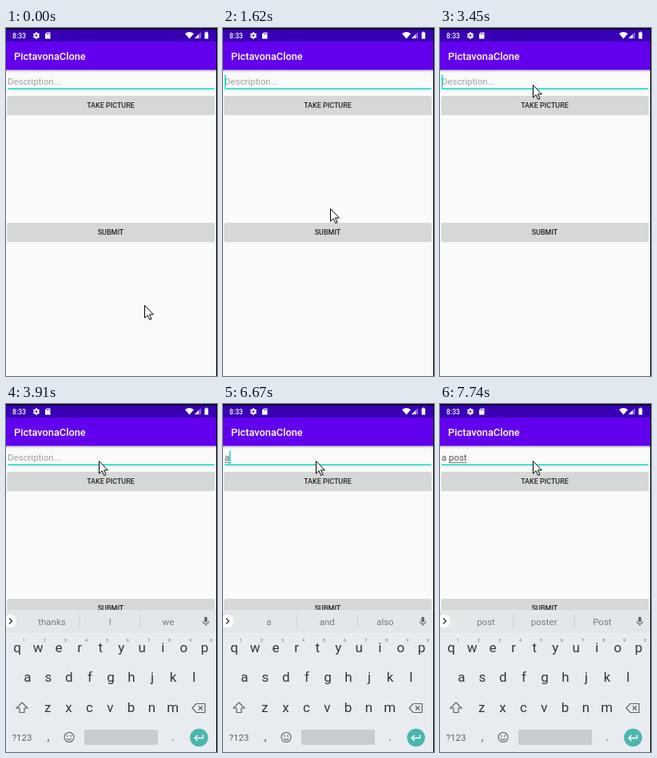
Recreate the animation shown at these times as an HTML page with a canvas. Size 264x436 px, loop 8 s.

```html
<!DOCTYPE html>
<html lang="en">
<head>
<meta charset="utf-8">
<title>Post form</title>
<style>
  html, body { margin: 0; width: 100%; height: 100%; overflow: hidden; background: #fafafa; }
  canvas { display: block; width: 264px; height: 436px; }
</style>
</head>
<body>
<canvas id="stage"></canvas>
<script>
const W = 264, H = 436, LOOP = 8000;
const canvas = document.getElementById('stage');
const ctx = canvas.getContext('2d');
const dpr = window.devicePixelRatio || 1;
canvas.width = W * dpr;
canvas.height = H * dpr;

// Each track holds its value until the next entry: [time, value]
const pointer = [
  [0, [173, 347]], [140, [173, 344]], [290, [172, 342]], [440, [170, 338]],
  [580, [170, 331]], [740, [170, 321]], [1620, [134, 226]], [1770, [105, 122]],
  [1910, [98, 88]], [2040, [95, 80]], [2190, [106, 72]], [2340, [115, 71]], [2490, [116, 71]]
];
const caretFlips = [580, 1020, 1620, 2040, 2490, 3020, 3170, 3910, 4460, 5000, 5430, 6020, 6550, 7740];
const typed = [[0, ''], [6550, 'a'], [6820, 'a p'], [6940, 'a po'], [7090, 'a pos'], [7210, 'a post']];
const words = [
  [0, ['thanks', 'I', 'we']], [6670, ['a', 'and', 'also']], [7210, ['post', 'poster', 'Post']]
];
const PRESS = [3170, 3450], KEYBOARD_AT = 3910;

const at = (track, t) => track.reduce((value, step) => t >= step[0] ? step[1] : value, track[0][1]);

function rect(x, y, w, h, color, r = 0) {
  ctx.fillStyle = color;
  ctx.beginPath();
  ctx.roundRect(x, y, w, h, r);
  ctx.fill();
}

function disc(x, y, r, color) {
  ctx.fillStyle = color;
  ctx.beginPath();
  ctx.arc(x, y, r, 0, Math.PI * 2);
  ctx.fill();
}

function label(str, x, y, size, color, align = 'center', weight = 400) {
  ctx.font = `${weight} ${size}px Roboto, Arial, sans-serif`;
  ctx.textAlign = align;
  ctx.fillStyle = color;
  ctx.fillText(str, x, y);
}

function shape(d, x, y, fill, stroke, width = 1) {
  const path = new Path2D(d);
  ctx.save();
  ctx.translate(x, y);
  if (fill) { ctx.fillStyle = fill; ctx.fill(path); }
  if (stroke) { ctx.strokeStyle = stroke; ctx.lineWidth = width; ctx.stroke(path); }
  ctx.restore();
}

function statusBar() {
  rect(0, 0, W, 18, '#3700b3');
  rect(0, 0, W, 1.5, '#000');
  label('8:33', 8, 12.5, 8.6, '#fff', 'left', 500);

  ctx.save();
  ctx.translate(38, 9.5);
  for (let i = 0; i < 6; i++) {
    rect(-1.1, -4.2, 2.2, 3, '#fff');
    ctx.rotate(Math.PI / 3);
  }
  ctx.restore();
  disc(38, 9.5, 3.2, '#fff');
  disc(38, 9.5, 1.3, '#3700b3');

  shape('M2 0H6.5V8H0V2Z', 49, 5.5, '#fff');
  for (let i = 0; i < 3; i++) rect(51 + i * 1.4, 6.5, 0.7, 1.8, '#3700b3');

  shape('M0 2Q5.5 -2 11 2L5.5 8.5Z', 224, 5, '#fff');
  shape('M8 0V8H0Z', 236, 5, 'rgba(255,255,255,.4)');
  shape('M5 3V8H0Z', 236, 5, '#fff');
  rect(248.5, 5.5, 4.6, 8, '#fff', 0.6);
  rect(249.8, 4.6, 2, 1.2, '#fff');
}

function appBar() {
  const shade = ctx.createLinearGradient(0, 52, 0, 56);
  shade.addColorStop(0, 'rgba(0,0,0,.24)');
  shade.addColorStop(1, 'rgba(0,0,0,0)');
  ctx.fillStyle = shade;
  ctx.fillRect(0, 52, W, 4);
  rect(0, 17, W, 35.4, '#6200ee');
  label('PictavonaClone', 10, 39.8, 12.8, '#fff', 'left', 500);
}

function button(str, y) {
  rect(1.5, y + 0.6, 259.4, 23.6, 'rgba(0,0,0,.14)', 1.5);
  rect(1.5, y, 259.4, 23.4, '#d6d7d7', 1.5);
  label(str, 131, y + 15.2, 8.96, '#222', 'center', 500);
}

function field(t) {
  const str = at(typed, t);
  const size = 11.4, base = 71.3;
  const pressed = t >= PRESS[0] && t < PRESS[1];
  rect(2, 75.6, 258.5, 1.3, '#03dac5');
  let end = 2;
  if (str) {
    label(str, 2, base, size, '#555', 'left');
    end += ctx.measureText(str).width;
    // The word being composed is underlined
    const start = 2 + ctx.measureText(str.slice(0, str.lastIndexOf(' ') + 1)).width;
    rect(start, 73, end - start, 0.8, '#666');
  } else {
    label('Description...', 2, base, size, pressed ? '#737373' : '#a0a0a0', 'left');
  }
  if (caretFlips.filter(f => t >= f).length % 2) rect(Math.round(end), 58.5, 1.4, 16.5, '#03dac5');
}

function suggestions(t) {
  rect(0, 258, W, 29, '#e4e7e9');
  at(words, t).forEach((word, i) => label(word, 57.5 + i * 72.7, 276.5, 11.5, '#757b80'));
  rect(91.5, 264, 1, 16, '#c9cdd0');
  rect(167.5, 264, 1, 16, '#c9cdd0');
  disc(5, 272, 8, '#fff');
  shape('M0 0L3.4 3.5L0 7', 4, 268.5, null, '#333', 1.3);

  rect(248.2, 266.5, 3.6, 7, '#5f666b', 1.8);
  shape('M0 0A3.5 3.5 0 0 0 7 0M3.5 3.5V6', 246.5, 272, null, '#5f666b', 1.1);
}

function keyRow(keys, x, y) {
  [...keys].forEach((key, i) => label(key, x + i * 26.05, y, 17, '#30363a'));
}

function keyboard(t) {
  rect(0, 258, W, 178, '#e8ecf0');
  suggestions(t);
  keyRow('qwertyuiop', 14, 311);
  [...'1234567890'].forEach((n, i) => label(n, 22.3 + i * 26.05, 298, 6, '#727a80'));
  keyRow('asdfghjkl', 26.8, 348);
  keyRow('zxcvbnm', 52.3, 386);

  const ink = '#596166';
  shape('M7 0L14 7H10V12.5H4V7H0Z', 13, 374, null, ink, 1.2);
  shape('M5 0H16V11H5L0 5.5Z', 233, 375.5, null, ink, 1.2);
  shape('M0 0L5 5M5 0L0 5', 241, 378.5, null, ink, 1.2);

  label('?123', 20, 421.5, 11.4, ink);
  label(',', 53, 422, 15, ink);
  label('.', 209, 422, 15, ink);
  shape('M12 6A6 6 0 1 1 0 6A6 6 0 1 1 12 6M3 7.3Q6 11.4 9 7.3', 73, 411.5, null, ink, 1.1);
  disc(77, 415.8, 0.9, ink);
  disc(81, 415.8, 0.9, ink);
  rect(98, 408, 92, 19, '#c8ccce', 1.5);
  disc(241.5, 418, 11.3, '#4db6ac');
  shape('M10.5 0V4H0M3.6 0.4L0 4L3.6 7.6', 236, 414.5, null, '#fff', 1.4);
}

function arrow([x, y]) {
  shape('M.5 .5V16.2L4.1 12.8L6.8 18.5L9.1 17.5L6.5 11.9H11.4Z', x, y, '#fff', '#000', 1);
}

function draw(t) {
  ctx.setTransform(dpr, 0, 0, dpr, 0, 0);
  rect(0, 0, W, H, '#fafafa');
  statusBar();
  appBar();
  field(t);
  button('TAKE PICTURE', 85);
  button('SUBMIT', 244);
  if (t >= KEYBOARD_AT) keyboard(t);
  rect(263, 0, 1, H, '#000');
  arrow(at(pointer, t));
}

const begin = performance.now();
function tick() {
  draw((performance.now() - begin) % LOOP);
  requestAnimationFrame(tick);
}
tick();
</script>
</body>
</html>
```
